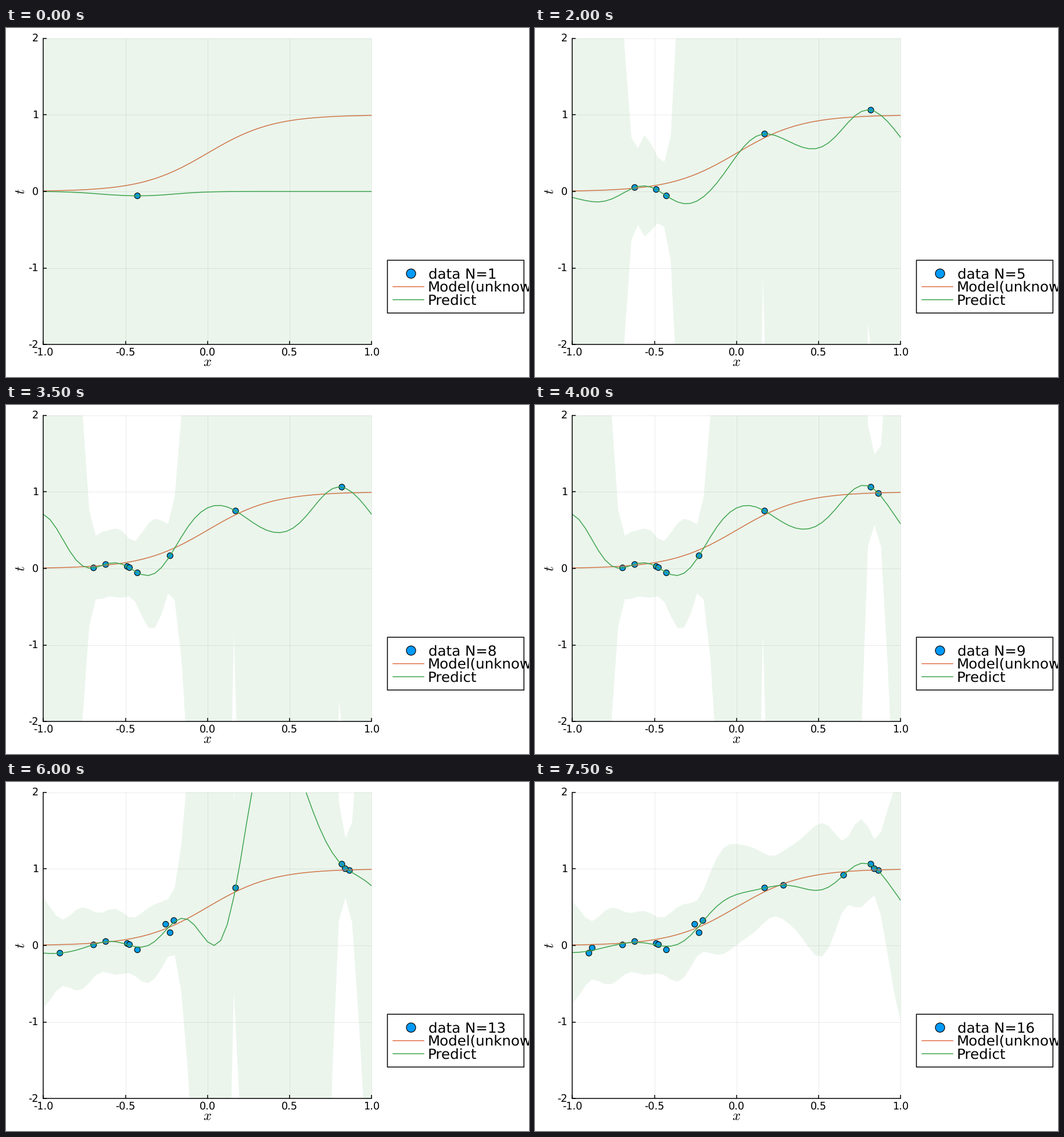
A matplotlib script that plays this animation: 900 by 600 pixels, repeating every 8000 ms.

```python
import numpy as np
import matplotlib.pyplot as plt
from matplotlib.animation import FuncAnimation
from matplotlib.patches import Circle, Rectangle

plt.rcParams.update({
    "font.family": "DejaVu Sans",
    "mathtext.fontset": "cm",
    "text.hinting": "no_hinting",
})

W, H, DPI = 900, 600, 100
PT = 72 / DPI  # points per pixel
BLUE, ORANGE, GREEN = "#009afa", "#e26f46", "#3da44d"

# Observations in order of arrival
DATA = np.array([
    (-0.427, -0.057), (-0.489, 0.026), (0.818, 1.063), (-0.620, 0.052),
    (0.171, 0.752), (-0.694, 0.008), (-0.4755, 0.011), (-0.228, 0.167),
    (0.8645, 0.980), (-0.899, -0.100), (-0.2547, 0.277), (-0.205, 0.326),
    (0.8385, 1.003), (0.2858, 0.786), (-0.879, -0.031), (0.652, 0.919),
])

# Bayesian linear regression on Gaussian basis functions
ALPHA, BETA, WIDTH = 0.001, 10.0, 0.15
CENTERS = np.linspace(-1, 1, 10)
XS = np.linspace(-1, 1, 51)


def basis(x):
    return np.exp(-(x[:, None] - CENTERS) ** 2 / (2 * WIDTH ** 2))


def predict(n):
    """Predictive mean and standard deviation after n observations."""
    x, t = DATA[:n].T
    phi, grid = basis(x), basis(XS)
    cov = np.linalg.inv(ALPHA * np.eye(len(CENTERS)) + BETA * phi.T @ phi)
    mean = grid @ (BETA * cov @ phi.T @ t)
    var = 1 / BETA + np.sum(grid @ cov * grid, axis=1)
    return mean, np.sqrt(var)


def px(x):
    return 346.8 + 282.6 * np.asarray(x)


def py(t):
    return 281.0 - 131.6 * np.asarray(t)


fig = plt.figure(figsize=(W / DPI, H / DPI), dpi=DPI, facecolor="white")
ax = fig.add_axes([0, 0, 1, 1])
ax.set_xlim(0, W)
ax.set_ylim(H, 0)
ax.axis("off")

LEFT, RIGHT, TOP, BOTTOM = px(-1), px(1), py(2), py(-2)
plot_area = Rectangle((LEFT, TOP), RIGHT - LEFT, BOTTOM - TOP,
                      transform=ax.transData)


def line(x, y, color="black", width=1.5, z=6, **kw):
    return ax.plot(x, y, color=color, lw=width * PT, zorder=z, **kw)[0]


def label(x, y, text, size, ha="center", **kw):
    kw.setdefault("va", "baseline")
    return ax.text(x, y, text, fontsize=size * PT, ha=ha, zorder=9, **kw)


def dot(x, y, radius, z):
    return ax.add_patch(Circle((x, y), radius, facecolor=BLUE, zorder=z,
                               edgecolor="black", lw=1.2 * PT))


# Grid, ticks and axes
for v in np.linspace(-1, 1, 5):
    x = px(v)
    line([x, x], [TOP, BOTTOM], width=0.75, z=1, alpha=0.1)
    line([x, x], [BOTTOM, BOTTOM - 6], solid_capstyle="butt")
    label(x, 563.2, f"{v:.1f}", 17.6)
for v in range(-2, 3):
    y = py(v)
    line([LEFT, RIGHT], [y, y], width=0.75, z=1, alpha=0.1)
    line([LEFT, LEFT + 6], [y, y], solid_capstyle="butt")
    label(56, y + 5.6, str(v), 17.6, ha="right")
line([LEFT, LEFT], [TOP, BOTTOM])
line([LEFT, RIGHT], [BOTTOM, BOTTOM])
label(346, 581.8, "$x$", 24.5)
label(25, 281, "$t$", 24.5, va="center", rotation=90)

# Legend
ax.add_patch(Rectangle((656.4, 399.3), 234.9, 90.7, facecolor="white",
                       edgecolor="black", lw=1.5 * PT, zorder=7, snap=False))
dot(697, 422.2, 8, 8)
line([666, 719], [444.7, 444.7], ORANGE, z=8, snap=False)
line([666, 719], [467.2, 467.2], GREEN, z=8, snap=False)
count = label(726.6, 430.3, "", 24.5, ha="left")
label(726, 453, "Model(unknown)", 24.5, ha="left")
label(726, 475.6, "Predict", 24.5, ha="left")

# Curves
points = [dot(px(x), py(t), 5, 2) for x, t in DATA]
model = line(px(XS), py(1 / (1 + np.exp(-5 * XS))), ORANGE, z=3)
band = ax.fill(px(XS), py(XS), facecolor=GREEN, alpha=0.1, lw=0, zorder=4)[0]
curve = line(px(XS), py(XS), GREEN, z=5)
for artist in (model, band, curve):
    artist.set_clip_path(plot_area)


def update(frame):
    n = frame + 1
    mean, spread = predict(n)
    curve.set_ydata(py(mean))
    edge_x = np.concatenate([XS, XS[::-1]])
    edge_t = np.concatenate([mean + spread, (mean - spread)[::-1]])
    band.set_xy(np.column_stack([px(edge_x), py(edge_t)]))
    for i, point in enumerate(points):
        point.set_visible(i < n)
    count.set_text(f"data N={n}")
    return band, curve, count, *points


anim = FuncAnimation(fig, update, frames=len(DATA), interval=500,
                     repeat=True, repeat_delay=0, blit=False)
plt.show()
```
